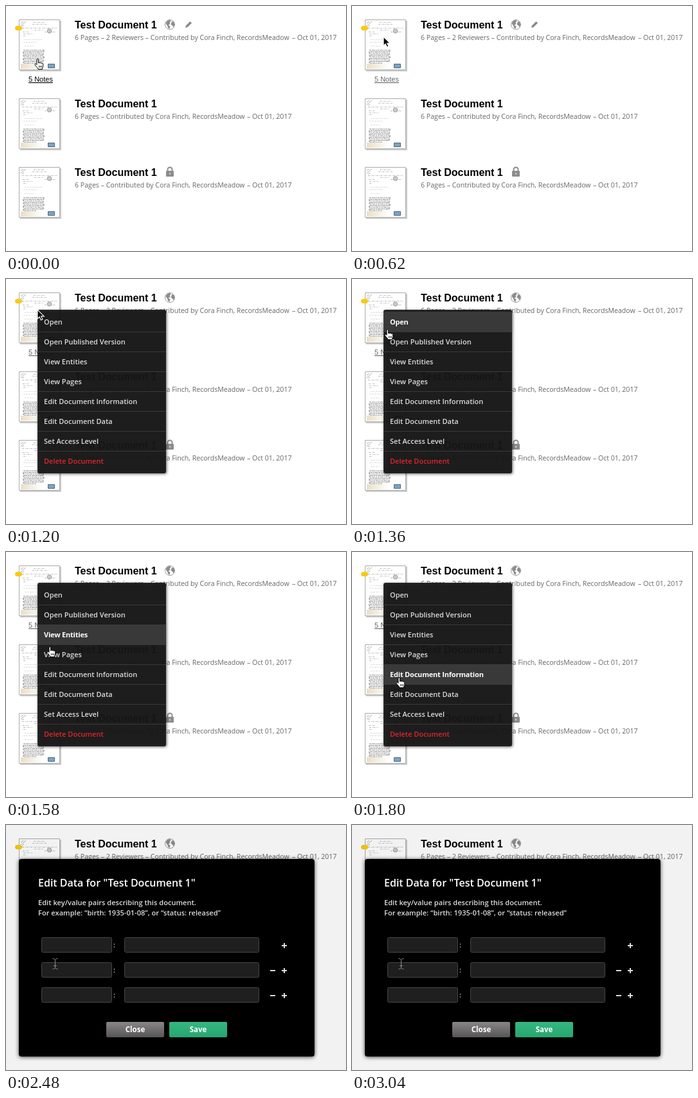
An HTML page that plays this animation: 529x382 px, repeating every 3060 ms.

```html
<!DOCTYPE html>
<html lang="en">
<head>
<meta charset="utf-8">
<title>Edit document data</title>
<style>
html, body { margin: 0; width: 100%; height: 100%; overflow: hidden; background: #fff; }
svg { display: block; width: 529px; height: 382px; font: 600 11px "Open Sans", "Noto Sans", sans-serif; }
.title { font: bold 16px "Liberation Sans", Arial, sans-serif; }
.meta { font-size: 10.6px; font-weight: 400; fill: #666; }
.date { text-anchor: end; }
#notes { font: 11px "Liberation Sans", Arial, sans-serif; text-decoration: underline; }
#menu text { fill: #ddd; }
#menu .row.on text { fill: #fff; font-weight: 700; letter-spacing: -.2px; }
#menu .row rect { fill: none; }
#menu .row.on rect { fill: #393939; }
#menu .row:last-child text { fill: #e3262d; }
#menu { filter: drop-shadow(1px 1px 2px rgba(0,0,0,.65)); }
#modal { filter: drop-shadow(0 1px 3px rgba(0,0,0,.75)); }
.field { fill: #1f1f1f; stroke: #454545; }
.button { font-size: 11.5px; font-weight: 700; fill: #fff; text-anchor: middle; }
</style>
</head>
<body>
<svg viewBox="0 0 529 382">
  <defs>
    <linearGradient id="grey" x2="0" y2="1"><stop stop-color="#8a8688"/><stop offset="1" stop-color="#575556"/></linearGradient>
    <linearGradient id="green" x2="0" y2="1"><stop stop-color="#35b780"/><stop offset="1" stop-color="#27a670"/></linearGradient>
    <linearGradient id="tan"><stop stop-color="#eadfc4"/><stop offset="1" stop-color="#fff"/></linearGradient>
    <g id="thumb" fill="none">
      <path d="M2 2h64v79h-64z" fill="#ccc"/>
      <path d="M.5.500h63v78h-63z" fill="#fff" stroke="#aaa"/>
      <path d="M3 69h34v8h-34z" fill="url(#tan)"/>
      <path d="M3 10l8-7M3 6l4-3M5 11l3-2" stroke="#999" stroke-width=".8"/>
      <path d="M23 4.500h18M21 7.500h22M5 13.500h54M24 16.500h14M6 19.500h9M40 19.500h18M7 22.500h14M7 25.500h5" stroke="#aaa" stroke-width=".8" stroke-dasharray="3 1.500 1 1"/>
      <circle cx="47.500" cy="18" r="3.300" fill="#ccc" stroke="#888" stroke-width=".8"/>
      <path d="M9 31.500h28M7 35.500h21M9 41.500h14" stroke="#ddd" stroke-dasharray="3 1"/>
      <path d="M7 48H39V50.500H7V53H38V55.500H7V58H39V60.500H7V63H38V65.500H7V68H27" stroke="#888" stroke-width="1.200" stroke-dasharray="3 .8 5 .8 2 .8"/>
      <path d="M45.500 69.500h10v6h-10z" fill="#7fa3bf" stroke="#456a86"/>
    </g>
  </defs>

  <g id="page">
    <use href="#thumb" x="20" y="21"/>
    <use href="#thumb" x="20" y="144"/>
    <use href="#thumb" x="20" y="251"/>
    <path d="M17 31h6l3 3.500-3 3.500h-6q-3-.5-3-3.500t3-3.500z" fill="#f9c914"/>
    <text id="notes" x="35" y="118">5 Notes</text>
    <g class="title">
      <text x="107" y="35">Test Document 1</text>
      <text x="107" y="158">Test Document 1</text>
      <text x="107" y="265">Test Document 1</text>
    </g>
    <g class="meta">
      <text x="107" y="53">6 Pages – 2 Reviewers – Contributed by Cora Finch, RecordsMeadow</text>
      <text x="107" y="176">6 Pages – Contributed by Cora Finch, RecordsMeadow</text>
      <text x="107" y="283">6 Pages – Contributed by Cora Finch, RecordsMeadow</text>
      <g class="date">
        <text x="514.500" y="53">– Oct 01, 2017</text>
        <text x="444.500" y="176">– Oct 01, 2017</text>
        <text x="444.500" y="283">– Oct 01, 2017</text>
      </g>
    </g>
    <circle cx="255" cy="29" r="7.500" fill="#fff" stroke="#999"/>
    <path d="M248.500 27q2-5 7-5l1 2-2 2 1 2-3 2 3 1.500-1 4q-3-1-3-4zM258 24l3 1 1.500 4-2 4-2-3-2-1z" fill="#8c8c8c"/>
    <path id="pencil" d="M279 34l1-3.500 6.500-6.500 2.500 2.500-6.500 6.500z" fill="#888"/>
    <path d="M251.500 258v-3a3.500 3.500 0 0 1 7 0v3" fill="none" stroke="#8c8c8c" stroke-width="2"/>
    <rect x="249" y="257" width="12" height="9" rx="1" fill="#8c8c8c"/>
    <path d="M254.500 260h1v3h-1z" fill="#fff"/>
  </g>

  <g id="menu"><rect x="49" y="48" width="200" height="255" rx="3" fill="rgba(23,23,23,.92)"/></g>

  <g id="dialog">
    <path d="M0 0h529v382H0z" fill="rgba(0,0,0,.05)"/>
    <g id="modal">
      <rect x="20" y="53" width="460" height="308" rx="4"/>
      <text x="50" y="96" fill="#fff" font-size="16">Edit Data for "Test Document 1"</text>
      <g fill="#ddd" font-size="11.100">
        <text x="50" y="125">Edit key/value pairs describing this document.</text>
        <text x="50" y="141">For example: “birth: 1935-01-08”, or “status: released”</text>
      </g>
      <g id="pairs"></g>
      <rect x="156" y="307" width="90" height="24" rx="2" fill="url(#grey)"/>
      <rect x="254" y="307" width="90" height="24" rx="2" fill="url(#green)"/>
      <text class="button" x="201" y="323">Close</text>
      <text class="button" x="299" y="323">Save</text>
    </g>
    <path d="M72.500 208.500h2l2 1.500 2-1.500h2M72.500 224.500h2l2-1.500 2 1.500h2M76.500 210v13M74 219.500h5" fill="none" stroke="#8a8a8a"/>
  </g>

  <g id="cursor">
    <path id="arrow" d="M0 0v14l3.200-3 2.200 5 2.500-1-2.200-4.900h4.500z" stroke="#fff" stroke-width="1.100"/>
    <g id="hand" transform="translate(-5 0)" fill="#fff" stroke="#000">
      <path d="M4 9.500V2a1.300 1.300 0 0 1 2.600 0V7a1.200 1.200 0 0 1 2.400.2 1.200 1.200 0 0 1 2.400.5 1.200 1.200 0 0 1 2.300.6V11.500c0 2-1.200 2.500-1.200 5H6c0-2-3.500-4-5-7-.5-1.500 1.500-2 3 0z"/>
      <path d="M7.500 11v3M9.500 11v3M11.500 11v3" stroke-width=".8"/>
    </g>
  </g>
</svg>
<script>
const LOOP = 3060, MENU_AT = 680, DIALOG_AT = 2480, LEAVE_AT = 60, ROLL_AT = 1240;
const $ = id => document.getElementById(id);
const show = (id, on) => $(id).style.display = on ? '' : 'none';

const items = ['Open', 'Open Published Version', 'View Entities', 'View Pages',
  'Edit Document Information', 'Edit Document Data', 'Set Access Level', 'Delete Document'];
$('menu').insertAdjacentHTML('beforeend', items.map((label, i) => {
  const y = 51 + 31 * i;
  const line = i ? `<path d="M49 ${y + .5}h200" stroke="#3a3a3a"/>` : '';
  return `<g class="row"><rect x="49" y="${y}" width="200" height="31"/>${line}<text x="59" y="${y + 20}">${label}</text></g>`;
}).join(''));
const rows = document.querySelectorAll('.row');

$('pairs').innerHTML = [175, 214, 253].map((y, i) => `
  <rect class="field" x="55.500" y="${y + .5}" width="109" height="23" rx="2"/>
  <rect class="field" x="184.500" y="${y + .5}" width="209" height="23" rx="2"/>
  <text x="167" y="${y + 16}" fill="#ccc">:</text>
  <path d="M429 ${y + 13}h8m-4-4v8${i ? 'm-22-4h8' : ''}" stroke="#ddd" stroke-width="2"/>`).join('');

// time, x, y, easing power of the way there
const path = [[20, 49, 82, 1], [540, 49, 48, .6], [1200, 49, 48, 1], [1580, 67.5, 147, 1.4],
  [1720, 71, 182, 1], [2120, 76, 215, .6]];

function pointAt(t) {
  const i = path.findIndex(p => p[0] > t);
  if (i < 1) return (i ? path[path.length - 1] : path[0]).slice(1, 3);
  const [a, b] = [path[i - 1], path[i]];
  const k = ((t - a[0]) / (b[0] - a[0])) ** b[3];
  return [1, 2].map(n => a[n] + (b[n] - a[n]) * k);
}

function draw(t) {
  const dialog = t >= DIALOG_AT, menu = t >= MENU_AT && !dialog;
  const rolling = menu && t >= ROLL_AT;
  const pointing = t < LEAVE_AT || rolling;
  show('menu', menu);
  show('dialog', dialog);
  show('pencil', t < MENU_AT);
  show('cursor', !dialog);
  show('hand', pointing);
  show('arrow', !pointing);
  $('notes').setAttribute('fill', t < LEAVE_AT ? '#000' : '#666');
  $('cursor').setAttribute('transform', `translate(${pointAt(t).map(Math.round)})`);
  // the highlight trails the pointer slightly
  const current = rolling ? Math.max(0, Math.floor((pointAt(t - 40)[1] - 51) / 31)) : -1;
  rows.forEach((row, i) => row.classList.toggle('on', i === current));
}

function tick() {
  draw(performance.now() % LOOP);
  requestAnimationFrame(tick);
}
tick();
</script>
</body>
</html>
```
